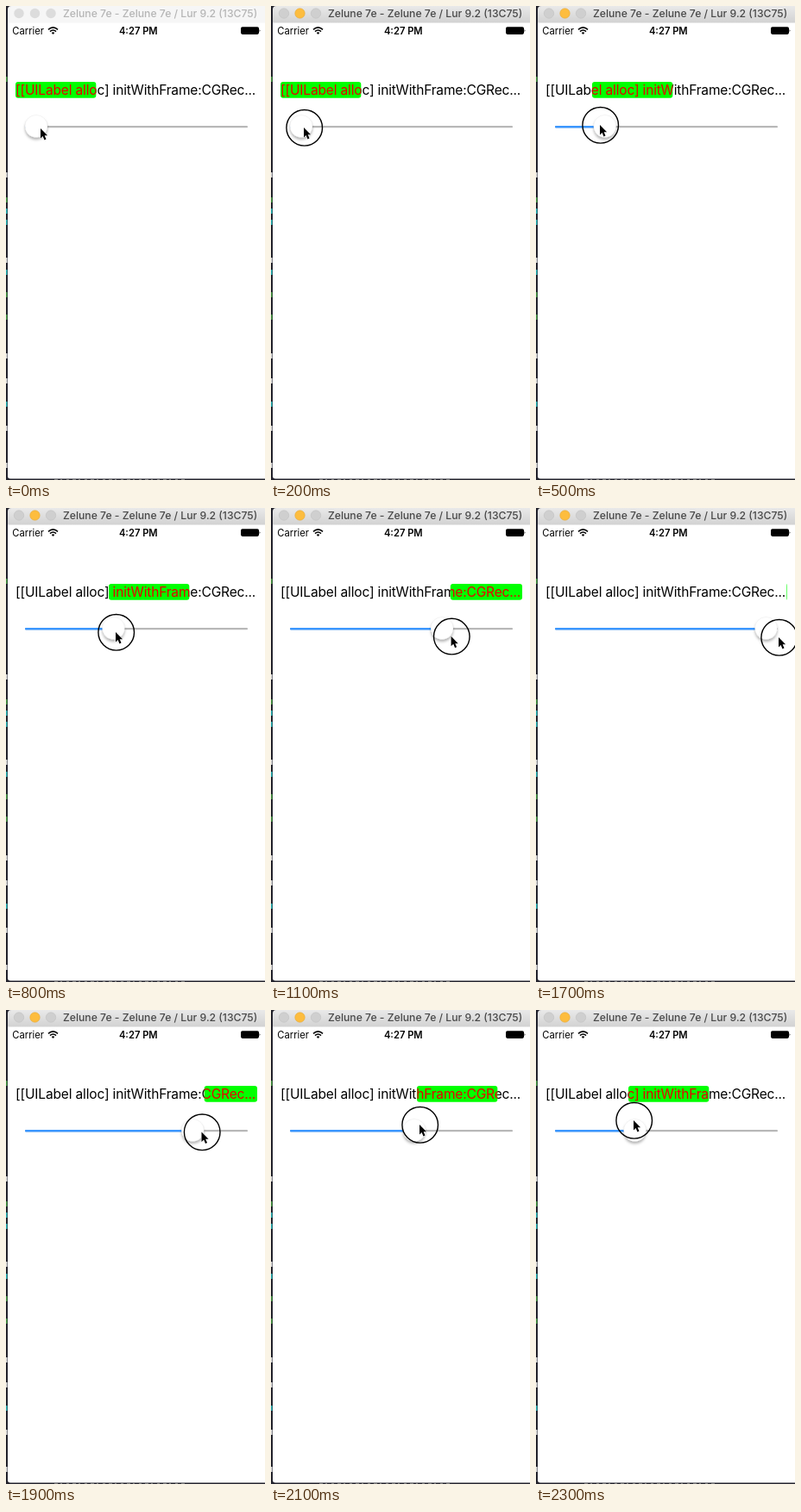
Recreate the animation shown at these times as an HTML page. Size 300 by 550 pixels, loop 2.4 s.

```html
<!DOCTYPE html>
<html lang="en">
<head>
<meta charset="utf-8">
<title>Label highlight slider</title>
<style>
html, body { margin: 0; width: 100%; height: 100%; overflow: hidden; background: #fff; }
svg { display: block; width: 300px; height: 550px; font-family: Inter, Roboto, sans-serif; }
.label { font-size: 15.5px; letter-spacing: -.16px; white-space: pre; }
.status { font-size: 11.2px; }
#bar { fill: #f6f6f6; }
#title { font-size: 12.2px; font-weight: 500; fill: #b5b5b5; }
.light { fill: #dcdcdc; }
.active #bar { fill: url(#chrome); }
.active #title { fill: #484848; }
.active .light { fill: #cfcfcf; stroke: #c2c2c2; stroke-width: .6; }
.active .middle { fill: #fdbd3f; stroke: #e5a836; }
#ring { visibility: hidden; }
.active #ring { visibility: visible; }
</style>
</head>
<body>
<svg id="stage" viewBox="0 0 300 550">
  <defs>
    <linearGradient id="chrome" x2="0" y2="1">
      <stop stop-color="#e9e9e9"/><stop offset="1" stop-color="#d2d2d2"/>
    </linearGradient>
    <filter id="shadow" x="-50%" y="-50%" width="200%" height="200%">
      <feDropShadow dx="0" dy="2.5" stdDeviation="1.6" flood-opacity=".3"/>
    </filter>
    <clipPath id="clip"><rect class="mark" y="88" height="18.8" rx="3"/></clipPath>
  </defs>

  <rect width="300" height="550" fill="#22222c"/>
  <g id="specks"></g>
  <path d="M2 10H300V548.5H5Q2 548.5 2 545.5Z" fill="#fff"/>
  <path id="bar" d="M2 19.5V4Q2 0 6 0H300V19.5Z"/>
  <circle class="light" cx="15" cy="8.5" r="5.7"/>
  <circle class="light middle" cx="33.5" cy="8.5" r="5.7"/>
  <circle class="light" cx="52" cy="8.5" r="5.7"/>
  <text id="title" x="66" y="13.3">Zelune 7e - Zelune 7e / Lur 9.2 (13C75)</text>

  <text class="status" x="7.3" y="32.6">Carrier</text>
  <text class="status" x="153.3" y="32.6" font-weight="600" text-anchor="middle">4:27 PM</text>
  <g fill="none" stroke="#000" stroke-width="1.6">
    <path d="M49 27.4Q54.5 22.4 60 27.4M51 29.6Q54.5 26.4 58 29.6"/>
    <path d="M52.7 30.9Q54.5 29.6 56.3 30.9L54.5 33Z" fill="#000" stroke="none"/>
  </g>
  <rect x="272" y="24.3" width="21" height="8.6" rx="1.8"/>
  <path d="M293.6 27Q295.4 28.6 293.6 30.3Z"/>

  <text class="label" x="11" y="103">[[UILabel alloc] initWithFrame:CGRec...</text>
  <rect class="mark" y="88" height="18.8" rx="3" fill="#0f0"/>
  <text class="label" x="11" y="103" fill="#e60000" clip-path="url(#clip)">[[UILabel alloc] initWithFrame:CGRec...</text>

  <rect x="22" y="139" width="258" height="2.2" rx="1" fill="#b8b8b8"/>
  <rect id="fill" x="22" y="139" height="2.4" rx="1" fill="#3b97ff"/>
  <circle id="thumb" cy="139.5" r="13" fill="#fff" stroke="#000" stroke-opacity=".08" stroke-width=".6" filter="url(#shadow)"/>

  <g id="pointer">
    <circle id="ring" cx=".7" cy="1.3" r="20.8" fill="none" stroke="#000" stroke-width="1.4"/>
    <path transform="translate(0 1) scale(.88)" d="M0 0V13L3 10.3 5.1 15.2 7.4 14.2 5.3 9.5H9.2Z" stroke="#fff" stroke-width="1" stroke-linejoin="round" paint-order="stroke"/>
  </g>
</svg>
<script>
const LOOP = 2400, STEP = 100, PRESS = 200;
const LEFT = 11, WIDTH = 280;
const $ = id => document.getElementById(id);
const marks = document.querySelectorAll('.mark');

// time, highlight start, pointer x, pointer y
const keys = [
  [0, 11, 40, 141], [200, 11, 38, 140], [500, 65, 74, 137],
  [800, 119, 127, 143], [1300, 267, 263, 151], [1500, 291, 284, 151],
  [1700, 290.4, 281, 149], [2100, 169, 172, 132], [2300, 107, 113, 127]
];

// slivers of the editor behind the window
const specks = { '#ddd': [196, 295, 406, 435, 490, 533], '#2bb5b8': [238, 251, 309, 462], '#4b9c46': [85, 225, 335, 361] };
let slivers = '';
for (const [color, rows] of Object.entries(specks))
  for (const y of rows) slivers += `<rect y="${y - 3}" width="1.5" height="6" fill="${color}"/>`;
for (let x = 56; x < 206; x += 7)
  slivers += `<rect x="${x}" y="549" width="${2 + x % 3}" height="1" fill="#777"/>`;
$('specks').innerHTML = slivers;

function pose(t) {
  const i = Math.max(1, keys.findIndex(k => k[0] >= t));
  const a = keys[i - 1], b = keys[i];
  const p = (t - a[0]) / (b[0] - a[0]);
  return a.map((v, n) => v + (b[n] - v) * p);
}

function draw(now) {
  const t = Math.floor(now % LOOP / STEP) * STEP;
  const [, start, x, y] = pose(t);
  const thumbX = 35 + 232 * (start - LEFT) / WIDTH;
  for (const m of marks) {
    m.setAttribute('x', start);
    m.setAttribute('width', Math.min(WIDTH / 3, LEFT + WIDTH - start));
  }
  $('fill').setAttribute('width', thumbX - 22);
  $('thumb').setAttribute('cx', thumbX);
  $('pointer').setAttribute('transform', `translate(${x} ${y})`);
  $('stage').classList.toggle('active', t >= PRESS);
}

const began = performance.now();
function tick() {
  draw(performance.now() - began);
  requestAnimationFrame(tick);
}
tick();
</script>
</body>
</html>
```
